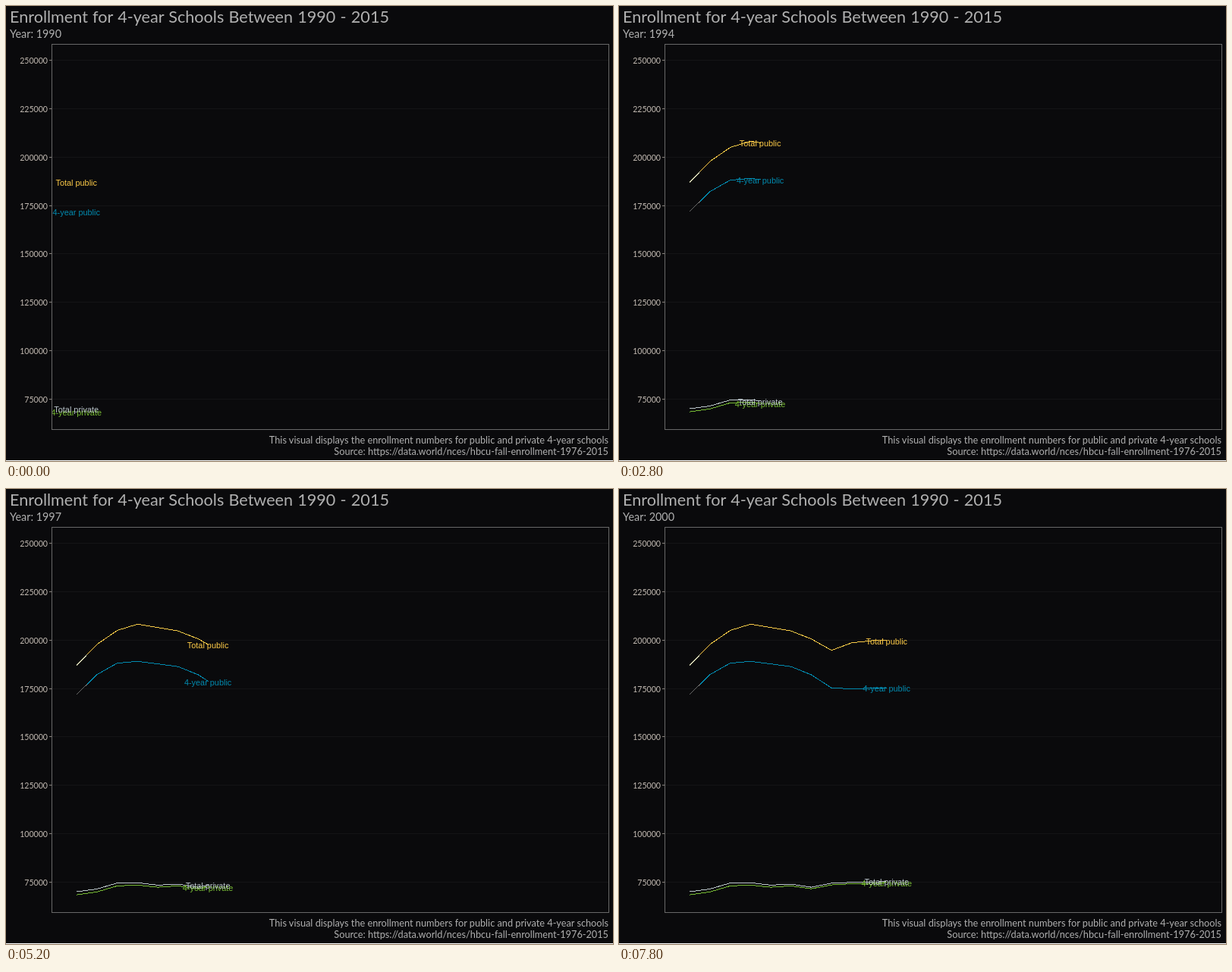
Write an HTML page that moves like this. It is 800 px wide and 600 px high and loops after 8 s.

```html
<!DOCTYPE html>
<html lang="en">
<head>
<meta charset="utf-8">
<title>Enrollment for 4-year Schools</title>
<style>
  html, body { margin: 0; width: 100%; height: 100%; overflow: hidden; background: #0a0a0c; }
  svg { display: block; width: 800px; height: 600px; }
  text { font-family: Lato, Carlito, sans-serif; fill: #b0b0b0; }
  .title { font-size: 21.6px; word-spacing: 0.7px; }
  .year { font-size: 14.4px; }
  .caption { font-size: 12.73px; text-anchor: end; }
  .axis text { font-size: 10.6px; text-anchor: end; fill: #c2bab2; }
  .labels text { font: 10.9px "Liberation Sans", Arial, sans-serif; text-anchor: middle; }
  path, .panel { fill: none; stroke-width: 1; shape-rendering: crispEdges; }
  .panel { stroke: #686868; }
  .grid { stroke: #141416; }
  .tick { stroke: #8a847e; }
</style>
</head>
<body>
<svg viewBox="0 0 800 600">
  <defs>
    <clipPath id="inside"><rect x="60" y="50" width="735" height="509"/></clipPath>
    <clipPath id="opening"><rect x="60" y="50" width="47" height="509"/></clipPath>
    <clipPath id="rest"><rect x="107" y="50" width="688" height="509"/></clipPath>
  </defs>
  <text class="title" x="5" y="22">Enrollment for 4-year Schools Between 1990 - 2015</text>
  <text class="year" x="5" y="42" id="year">Year: 1990</text>
  <g class="axis" id="axis"></g>
  <g clip-path="url(#inside)">
    <g id="lines"></g>
    <g class="labels" id="labels"></g>
  </g>
  <rect class="panel" x="60.5" y="50.5" width="734" height="508"/>
  <text class="caption" x="794" y="577">This visual displays the enrollment numbers for public and private 4-year schools</text>
  <text class="caption" x="794" y="592">Source: https://data.world/nces/hbcu-fall-enrollment-1976-2015</text>
  <rect y="599" width="800" height="1" fill="#fff"/>
</svg>
<script>
const STEP_MS = 200, STEPS = 40, STEPS_PER_YEAR = 4;
const byId = id => document.getElementById(id);

// Enrollment in thousands, one value per year from 1990.
const series = [
  { name: '4-year private', color: '#78bc34',
    values: [68.5, 70, 73.1, 73.5, 72.4, 73.1, 71.6, 73.6, 74.2, 74, 75.3] },
  { name: '4-year public', color: '#028bb0', startColor: '#666666',
    values: [172, 182.2, 188.1, 189, 187.7, 186.3, 182.1, 175.3, 174.8, 175.2, 175.4] },
  { name: 'Total private', color: '#bcc6cc',
    values: [70.1, 71.5, 74.6, 74.7, 73.5, 74, 72.4, 74.5, 74.9, 74.8, 75.9] },
  { name: 'Total public', color: '#ffcc48', startColor: '#d6d6b4',
    values: [187, 197.8, 205, 208.2, 206.5, 204.7, 200.6, 194.7, 198.6, 199.7, 199.8] }
];

const xAt = years => 93.3 + years * 26.68;
const yAt = value => 518.5 - (value - 75) * 2.5543;

function add(parent, tag, attrs, text = '') {
  const node = document.createElementNS('http://www.w3.org/2000/svg', tag);
  for (const key in attrs) node.setAttribute(key, attrs[key]);
  node.textContent = text;
  return parent.appendChild(node);
}

function valueAt(values, years) {
  const i = Math.floor(years), next = values[Math.min(i + 1, values.length - 1)];
  return values[i] + (next - values[i]) * (years - i);
}

function linePath(values, years) {
  const stops = values.map((_, i) => i).filter(i => i < years).concat(years);
  return 'M' + stops.map(s => xAt(s).toFixed(2) + ' ' + yAt(valueAt(values, s)).toFixed(2)).join('L');
}

for (let value = 75; value <= 250; value += 25) {
  const y = Math.floor(yAt(value)) + 0.5, axis = byId('axis');
  add(axis, 'path', { class: 'grid', d: `M61 ${y}H794` });
  add(axis, 'path', { class: 'tick', d: `M57 ${y}H60` });
  add(axis, 'text', { x: 55, y: y + 4.5 }, value * 1000);
}

for (const s of series) {
  const addLine = (stroke, clip) =>
    add(byId('lines'), 'path', { stroke, 'clip-path': `url(#${clip})` });
  s.lines = [addLine(s.startColor || s.color, 'opening'), addLine(s.color, 'rest')];
  s.label = add(byId('labels'), 'text', { style: `fill:${s.color}` }, s.name);
}

function draw(step) {
  const years = step / STEPS_PER_YEAR;
  byId('year').textContent = 'Year: ' + Math.round(1990 + step * 25 / 99);
  for (const s of series) {
    const path = linePath(s.values, years);
    for (const line of s.lines) line.setAttribute('d', path);
    s.label.setAttribute('x', (xAt(years) - 0.6).toFixed(1));
    s.label.setAttribute('y', Math.round(yAt(valueAt(s.values, years)) + 5));
  }
}

let shown = -1;
const startTime = performance.now();
function tick() {
  const step = Math.floor((performance.now() - startTime) / STEP_MS) % STEPS;
  if (step !== shown) draw(shown = step);
  requestAnimationFrame(tick);
}
tick();
</script>
</body>
</html>
```
